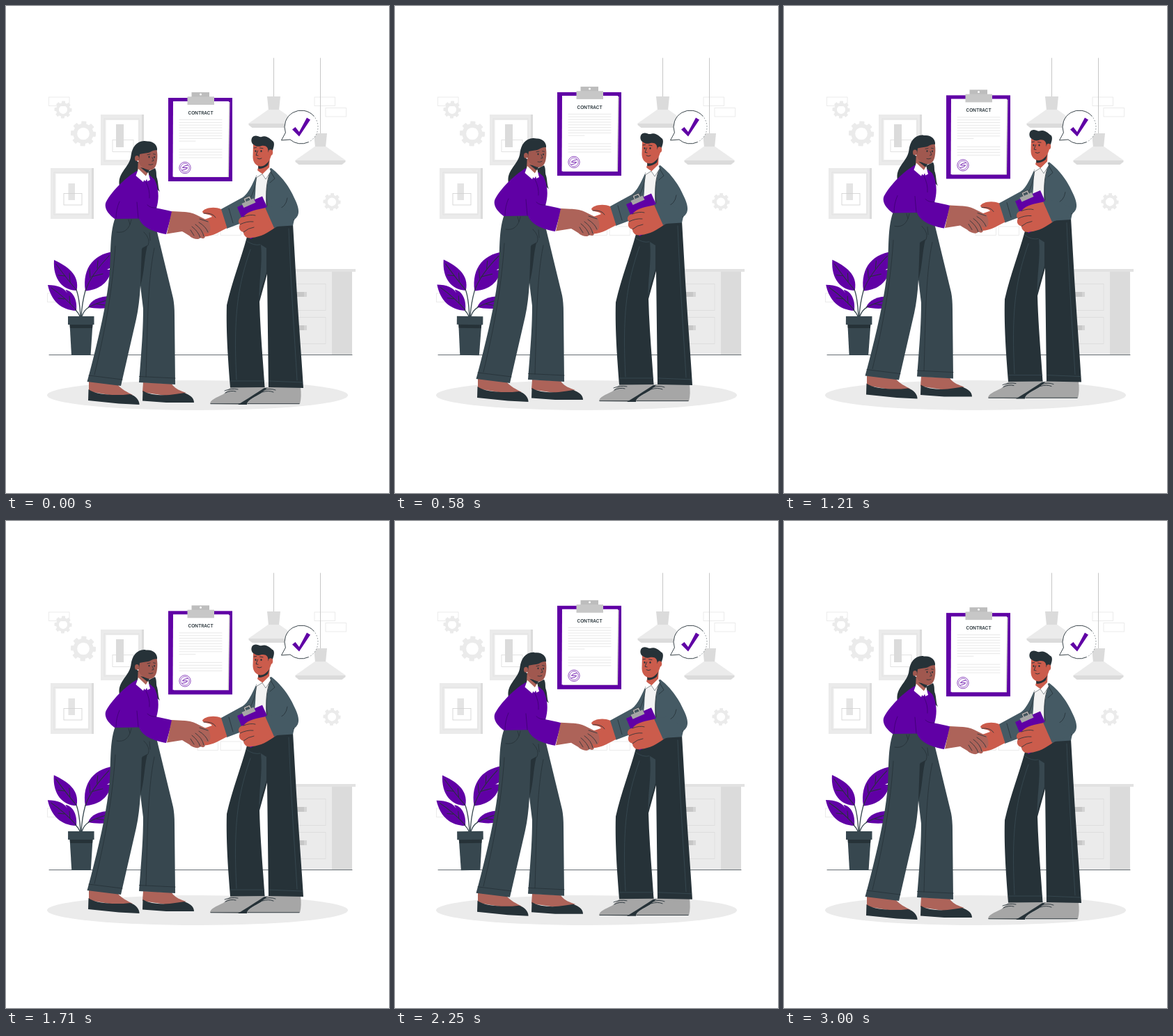
Write an HTML page that moves like this. It is 550x700 px and loops after 3.04 s.

```html
<!DOCTYPE html>
<html lang="en">
<head>
<meta charset="utf-8">
<title>Handshake</title>
<style>
html, body { margin: 0; width: 100%; height: 100%; overflow: hidden; background: #fff; }
svg { display: block; width: 100vw; height: 100vh; }
path { stroke-linecap: round; stroke-linejoin: round; }
</style>
</head>
<body>
<svg id="stage" viewBox="0 0 550 700"></svg>
<script>
const INK = '#263238', SLATE = '#37474f', JACKET = '#455a64', PURPLE = '#6000a5';
const PALE = '#ebebeb', LIGHT = '#dbdbdb', GREY = '#c7c7c7', SHOE = '#a6a6a6';
const HER = '#ad6359', HER_FACE = '#a0584f', HIM = '#cb5c4c';

const shape = (fill, d) => `<path fill="${fill}" d="${d}"/>`;
const line = (color, width, d) => `<path fill="none" stroke="${color}" stroke-width="${width}" d="${d}"/>`;
const box = (fill, x, y, w, h) => `<rect x="${x}" y="${y}" width="${w}" height="${h}" fill="${fill}"/>`;
const outline = (color, x, y, w, h) =>
  `<rect x="${x}" y="${y}" width="${w}" height="${h}" fill="none" stroke="${color}" stroke-width=".8"/>`;
const dot = (fill, x, y, rx, ry = rx) => `<ellipse cx="${x}" cy="${y}" rx="${rx}" ry="${ry}" fill="${fill}"/>`;
const ring = (color, width, x, y, r) =>
  `<circle cx="${x}" cy="${y}" r="${r}" fill="none" stroke="${color}" stroke-width="${width}"/>`;
const group = (id, ...parts) => `<g id="${id}">${parts.join('')}</g>`;

function gear(x, y, r) {
  let teeth = '';
  for (let i = 0; i < 8; i++)
    teeth += `<rect x="${-r * .2}" y="${-r}" width="${r * .4}" height="${r * .4}" rx="${r * .06}"
      transform="translate(${x} ${y}) rotate(${i * 45 + 3})" fill="${PALE}"/>`;
  return teeth + ring(PALE, r * .32, x, y, r * .65);
}

function picture(x, y, bar) {
  return box(PALE, x, y, 62, 73) + box(LIGHT, x + 59, y, 3, 73) +
    outline('#e0e0e0', x + 5, y + 6, 50, 61) + box('#fff', x + 7.5, y + 8, 46.5, 57) + bar;
}

function lamp(x, y) {
  return line(GREY, 1, `M${x} 75V${y}`) +
    shape(LIGHT, `M${x - 9.5} ${y}h19l-2 20h-15z`) +
    shape(PALE, `M${x - 8} ${y + 19}h16l28.5 20h-73z`) +
    shape(LIGHT, `M${x - 36} ${y + 39}h72v2l-5 4h-62l-5-4z`);
}

function drawer(y) {
  return outline(LIGHT, 400, y, 59, 38) + box(GREY, 410, y + 11.5, 18, 7) + box('#d4d4d4', 428, y + 11.5, 4, 7);
}

const bricks = [[61.5, 131], [443, 131], [459, 146.5], [275, 317], [308, 317], [59.5, 413]]
  .map(([x, y]) => outline('#e6e6e6', x, y, 29.5, 12.5)).join('');

const room = group('room',
  bricks, gear(82, 149, 12.5), gear(111, 183.5, 18), gear(468, 281.5, 12.5),
  picture(136, 156, box(LIGHT, 158, 170, 11, 33) + outline(LIGHT, 153, 192.5, 30, 17)),
  picture(64, 233, box('#e4e4e4', 89.5, 255, 9.5, 24) + outline('#d0d0d0', 83, 269.5, 26, 16.5)),
  lamp(384.5, 130), lamp(451.5, 183),
  box(PALE, 405, 382, 63, 119), box(LIGHT, 468, 382, 29, 119), box('#e2e2e2', 405, 378, 97, 4),
  drawer(399.5), drawer(447.5),
  line(INK, .7, 'M62 501.5H497'),
  dot(PALE, 275, 559.5, 216, 21.5));

const bubble = group('bubble',
  dot('#fff', 424, 174, 24), shape('#fff', 'M401.4 182L395.5 193L408 192Z'),
  line(INK, .9, 'M442 158.1A24 24 0 0 0 401.4 182L395.5 193L408 192A24 24 0 0 0 434 195.8'),
  `<path d="M434 195.8A24 24 0 0 0 442 158.1" fill="none" stroke="${INK}" stroke-width=".5" stroke-dasharray="1 3"/>`,
  shape(PURPLE, 'M411 177.5L415.5 174L421 181L432 160.5L437 163.5L421 187.5Z'));

const plant = group('plant',
  shape(PURPLE, 'M101.5 409C82 409 67 393 69 365C88 374 106 386 101.5 409Z'),
  shape(PURPLE, 'M114 409.5C109 376 127 354 162 352C161 366 155 375 145 379L152 379C146 401 131 408 114 409.5Z'),
  shape(PURPLE, 'M101 438C79 437 65 424 60 401C74 401 84 405 88 413L85.5 408C95 409 103 421 101 438Z'),
  shape(PURPLE, 'M118 433C122 422 135 416 156 417L154 432C142 436 128 435 118 433Z'),
  line(INK, 1, 'M101 408Q88 393 72 371M92 397L91 384M85 388L75 387M114 409Q122 386 148 359M121 391L120 378M123 389L139 385M131 377L132 366'),
  line(INK, 1, 'M101 437Q85 419 65 405M92 428L91 417M84 421L75 420M118 433Q132 426 148 422M130 428L142 430'),
  line(SLATE, 1.3, 'M107 446C106 430 105 418 101 408M108 446C109 430 111 420 114 409M106 446Q104 441 100 437M109 446Q112 437 119 433'),
  shape(SLATE, 'M91.5 457H124.5L121.5 502H94Z'),
  shape(INK, 'M91.5 457H124.5L124 463H92Z'), box(SLATE, 89, 446, 37.5, 12));

const rows = [];
for (let i = 0; i < 8; i++) rows.push(`M249 ${163.5 + i * 3.85}H310`);
rows.push('M249 194.2H272');
for (let i = 0; i < 4; i++) rows.push(`M249 ${206 + i * 4}H310`);

const contract = group('contract',
  box(PURPLE, 233, 132, 92, 120),
  shape('#d5d5d5', 'M241 138H321.5L320 246H241Z'), shape('#fff', 'M240 137H320L318.5 245.5H239.5Z'),
  line('#e2e2e2', .8, rows.join('')),
  box('#bdbdbd', 266.5, 124, 25.5, 7), box(GREY, 260.5, 130.3, 38.5, 11.7), dot('#fff', 279.5, 127, 1.5),
  `<text x="279.6" y="156.1" font-family="Inter, sans-serif" font-weight="600" font-size="6.4" text-anchor="middle" fill="${INK}">CONTRACT</text>`,
  ring(PURPLE, .7, 257, 232.5, 8.2), ring(PURPLE, .6, 257, 232.5, 6.2),
  line(PURPLE, .9, 'M261 229Q254 230 253.5 232.5H260.5Q260 235 253 236'));

const herLegs =
  shape(HER, 'M119 539L160 544C166 551 174 555 182 559L160 561L119 554Z') +
  shape(HER, 'M197 541L238 543C242 550 250 553 259 556L235 561L196 555Z') +
  shape(INK, 'M118.5 551C126 557 143 559 158 559C165 559 172 559 178 558C186 560 192 567 191.5 573L162 571.5L118 567Z') +
  shape(INK, 'M196.5 553C205 559 222 560 235 559C243 558 250 557 256 556C264 559 270 563 270 570L230 570L196 567.5Z') +
  shape(SLATE, 'M157 304L205 304L217 325L240 420Q242 430 242 445L243 544L191 541C194 500 197 470 197 435L193 402C192 420 190 436 187 450L165 546L116.5 540C130 490 142 440 147 400C152 368 147 330 157 304Z') +
  shape(INK, 'M195 349L203 344C198 365 199 382 193 402Z') +
  line(INK, .8, 'M159 325Q176 328 180 307M198 325Q208 335 204 344L196 348M206 326L207 337M213 348C203 395 203 470 201 533M157 345C152 420 139 480 127 530M119 531L167 537M191.5 532.5L243 535M176 307L178 314');

const herTop =
  shape(INK, 'M200 194C188 193 181 203 179.5 215C178 230 164 237 162.5 252C162 262 166 267 176 262L205 235L205 205Z') +
  shape(INK, 'M204 238L214 233C217 238 215 243 217 248C219 255 218 262 221 267C215 262 210 256 206 246Z') +
  shape(PURPLE, 'M188 237C172 246 151 267 143.5 282C140 291 148 300 156 306L191 305.5C196 319 213 325 230 328L239 295.5C231 293 223 292 216 290.5C220 278 220 262 213 249L206 243L200 252Z') +
  line('#3d0070', .8, 'M158 305Q158 292 163 281M190 305L188 282M216 290Q208 291 203 286M201 253Q207 265 206 276') +
  shape(HER, 'M190 220L205 229L204 240L199 247L189 237Z') +
  shape(INK, 'M193 232L207 235L203 240Z') +
  shape(HER_FACE, 'M188 210L216 204C218 213 217.5 219 216.5 225C215 233 210 237 204 235.5C198 234 192 230 190 223Z') +
  shape(INK, 'M183 216C182 202 192 193 203 194.5C211 194 218 200 217 207.5C212 206 208 210 204 211C199 212 195 212 192 213L191 221L187 224Z') +
  dot(HER_FACE, 188, 219, 3, 4) + dot('#fff', 189.5, 223, .9) +
  dot(INK, 205.5, 217, 1, 1.4) + dot(INK, 213, 217.3, .9, 1.3) +
  line(INK, .8, 'M203 213.8L207 213M211.5 212.7L214.5 213.3M210 217.5L212 222.5L209.5 223M205 228Q208 229 211 227.5') +
  shape('#fff', 'M190 234L186.5 244L197 253L201 244.5Z') +
  shape('#fff', 'M201 244.5L204 239L207 250L203 252Z');

const herHand =
  shape(HER, 'M238 295C252 296 264 295 273 300L291 309C294 315 295 326 289 327L283 325C289 333 284 336 279 333C277 337 268 335 263 330L253 324L231 327.5Z') +
  line(INK, .8, 'M277 311Q287 317 290 325M272 314Q282 321 284 331M267 317Q276 324 279 333M265 322L270 330M278 306L290 310');

const hisLegs =
  shape(SHOE, 'M293 572C293 566 302 563 312 558C318 553 321 549 325 547L372 547C370 556 350 562 346 571L336 573Z') +
  shape(INK, 'M333 573C345 566 360 556 371 549L378 548L366 557C358 562 347 566 346 573Z') +
  shape(SHOE, 'M346 572C347 566 358 562 366 557C372 552 374 549 378 547L423 548C424 556 424 565 422 572Z') +
  line(INK, .9, 'M314 553Q324 549 333 551M315 556Q323 552 330 554M371 552Q379 549 387 552M368 555Q377 552 384 555M294 571.7H336M347 571.7H421') +
  shape(INK, 'M350 315L412 313L417 400C420 450 424 500 427 549L377 548L375 385L364 425C365 465 369 510 371.5 548L322 548.5C318 500 316 460 317 430C325 395 337 365 346 332Z') +
  shape(SLATE, 'M366 343L374 348L374 382C371 395 364 408 364 425C362 400 369 372 366 343Z') +
  line(JACKET, .5, 'M346 338Q356 345 365 343M351 350C334 400 326 440 331 537M323 539L371 539M378 539L426 541M406 320C409 400 414 470 418 538');

const hisTop =
  shape(JACKET, 'M362 239C356 250 350 268 340 275L308 292.5L317 320L346 309L372 318L412 315.5L414 307C424 300 420 288 414 276C406 258 395 244 381 233Z') +
  shape('#f3f3f3', 'M359 247L362 237L377 232L380 238C374 252 372 272 374 300L352 298C359 282 358 265 359 247Z') +
  line(INK, .8, 'M380 237C373 254 373 270 375 287M380 238L386 248L379 254M360 244C358 265 351 280 340 291M320 291L326 312M414 307L386 308M404 276Q402 290 390 292') +
  shape(HIM, 'M364 226L379 212L378 233L368 242L361 236Z') +
  shape(INK, 'M362 229Q373 230 378.5 221L376 229Q370 234 362.5 234Z') +
  shape(HIM, 'M355 199L378 197L382 209C381 219 376 227 369 230C361 232 354.5 226 354.5 217Z') +
  shape(INK, 'M357 200C351 198 351 189 356 187C360 185 364 189 367 188C375 185 381 193 383 194C387 197 384 205 381.5 211L376.5 210C377 203 373 200 367 201C363 202.5 359 202 357 200Z') +
  dot(HIM, 380, 210.5, 3.2, 4.2) +
  dot(INK, 358.5, 208.5, 1, 1.5) + dot(INK, 366.5, 208.5, 1.1, 1.5) +
  line(INK, .9, 'M356 204L359.5 203.5M364.5 204L369 204.7M361.5 208L359 214.5L362 215M361 219Q364 221 367 219') +
  shape('#fff', 'M361 237L359 247L368 241ZM368 242L378 232L380 238L373 249Z') +
  line(INK, .5, 'M359 247L368 241.5L373 249L380 238') +
  shape(PURPLE, 'M332 289L368 273.5L387 316L351 335Z') +
  line(INK, 3, 'M344 281L342.5 277.5L349.5 274.5L351 278') +
  line(SHOE, 2, 'M344 281L342.5 277.5L349.5 274.5L351 278') +
  shape(SHOE, 'M338.5 284L355.5 276.5L358.5 282.5L341.5 290Z') +
  shape(HIM, 'M373 290C360 293 348 294 341 303C334 304 332 310 336 314C333 319 336 324 341 325C341 331 347 335 353 333C366 332 376 326 387 318Z') +
  line(INK, .8, 'M336 314Q346 309 355 310M341 325Q348 319 356 318M341 303Q351 299 358 301') +
  shape(JACKET, 'M372 289.5L390 287L415 300L412 308L385 319Z');

const hisHand =
  shape(HIM, 'M309 292C298 287 283 291 282 296C284 301 293 298 296 303L279 309L274 326C281 335 292 331 302 327L317.5 319Z') +
  line(INK, .8, 'M284 298Q297 297 301 304');

document.getElementById('stage').innerHTML = room + plant + contract + bubble +
  group('people', hisLegs, hisTop, hisHand, herLegs, herTop, herHand);

const LOOP = 3040, RISE = 10.6;
const part = id => document.getElementById(id);
const [people, paper, leaves] = [part('people'), part('contract'), part('plant')];

// Linear rise and fall from 0 to 1 and back.
function bounce(t, period) {
  const p = (t % period) / period;
  return 1 - Math.abs(2 * p - 1);
}

function draw(t) {
  const lift = (period, rest) => `translate(0 ${rest - RISE * bounce(t + 25, period)})`;
  people.setAttribute('transform', lift(LOOP, .17));
  paper.setAttribute('transform', lift(LOOP / 2, .35));
  const sway = .8 * (2 * bounce(t + LOOP / 4, LOOP) - 1);
  leaves.setAttribute('transform', `rotate(${sway} 107 437)`);
}

let start;
function tick(now) {
  start ??= now;
  draw((now - start) % LOOP);
  requestAnimationFrame(tick);
}
draw(0);
requestAnimationFrame(tick);
</script>
</body>
</html>
```
